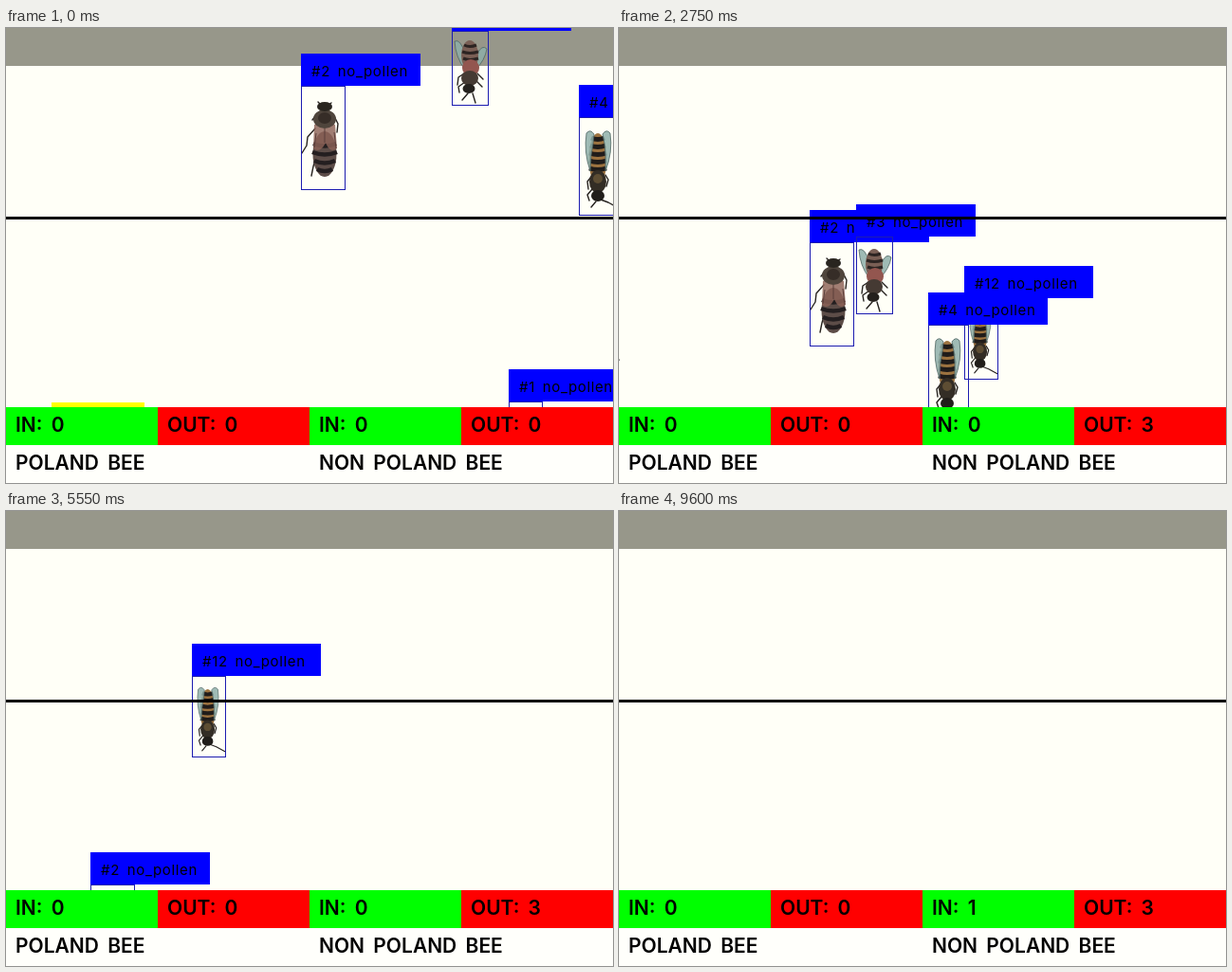
These frames come from a looping animation (640 px wide and 480 px high, 10 s). An HTML page:

```html
<!DOCTYPE html>
<html lang="en">
<head>
<meta charset="utf-8">
<title>Bee counter</title>
<style>
  html, body { margin: 0; width: 100%; height: 100%; overflow: hidden; background: #fffff7; }
  svg { display: block; width: 640px; height: 480px; }
  text { font-family: Inter, "Open Sans", sans-serif; fill: #000; }
  .panel text { font-size: 21px; font-weight: 600; word-spacing: 4px; }
  .tags text { font-size: 15px; letter-spacing: .65px; word-spacing: 3px; }
  .frame { fill: none; stroke: #1c1cb0; stroke-width: 1; }
  .leg { fill: none; stroke: #26221f; stroke-width: 1.4; stroke-linecap: round; stroke-linejoin: round; }
  .wing { fill: #8fb0aa; fill-opacity: .85; stroke: #4f6562; stroke-width: .8; }
</style>
</head>
<body>
<svg viewBox="0 0 640 480" xmlns="http://www.w3.org/2000/svg">
  <defs>
    <!-- head up, long left legs -->
    <g id="plain">
      <path class="leg" d="M15 45 7 54 6 63 1 71M15 78 13 85 11 95M16 31 12 36M35 32 39 40 38 49M21 20 18 17M29 20 32 18"/>
      <ellipse cx="25" cy="72" rx="12.5" ry="24" fill="#5d4d48"/>
      <path d="M13 61Q25 66 37 61M12 70Q25 75 38 70M14 79Q25 84 36 79M17 88Q25 92 33 88" fill="none" stroke="#241f20" stroke-width="4.5"/>
      <path d="M14 41Q24 35 36 41L38 66Q31 72 26 60Q20 72 13 66Z" fill="#8d6257" fill-opacity=".82"/>
      <path d="M16 50 14 65M35 49 37 66M25 45V60" stroke="#5a3e3a" fill="none"/>
      <ellipse cx="25" cy="35" rx="12" ry="10" fill="#4f453c"/>
      <ellipse cx="25" cy="34" rx="7" ry="6" fill="#362d27"/>
      <ellipse cx="25" cy="22" rx="8" ry="5" fill="#29251f"/>
    </g>
    <!-- head down, open wings -->
    <g id="open">
      <path class="leg" d="M13 48 7 52 6 60M14 57 7 62 8 68M27 48 33 54M26 56 32 62M17 69 11 76M22 69 25 79"/>
      <path class="wing" d="M14 44Q4 31 3 14Q9 11 14 27L17 42ZM25 44Q35 34 37 22Q32 17 27 27Z"/>
      <ellipse cx="19" cy="29" rx="9" ry="16" fill="#7a5f55"/>
      <path d="M13 18Q19 21 26 18M11 25Q19 28 28 25M12 32Q19 35 28 32" fill="none" stroke="#2c2422" stroke-width="3"/>
      <ellipse cx="20" cy="42" rx="9" ry="9" fill="#93564f"/>
      <ellipse cx="19" cy="53" rx="9" ry="8" fill="#453a33"/>
      <ellipse cx="18" cy="64" rx="6.5" ry="5" fill="#25211d"/>
    </g>
    <!-- head down, folded wings and one long feeler -->
    <g id="striped">
      <path class="leg" d="M13 63 9 68 10 76M28 61 31 66 29 73M14 76 9 82 11 88M18 89 13 95M23 87 31 90 42 96"/>
      <ellipse cx="20" cy="44" rx="9.5" ry="27" fill="#9d7340"/>
      <path d="M13 22Q20 25 27 22M12 30Q20 33 28 30M11 38Q20 41 29 38M11 46Q20 49 29 46M11 54Q20 57 29 54" fill="none" stroke="#201c1a" stroke-width="5"/>
      <path class="wing" d="M12 57Q5 37 8 17Q12 12 16 18L15 28 13 40ZM28 57Q36 37 33 17Q29 12 25 18L27 28 28 40Z"/>
      <ellipse cx="20" cy="68" rx="9" ry="12" fill="#332d25"/>
      <ellipse cx="20" cy="65" rx="5" ry="5" fill="#5d4d33"/>
      <ellipse cx="20" cy="83" rx="7" ry="6" fill="#211e1a"/>
    </g>
    <g id="loaded">
      <use href="#plain" transform="translate(4 -2) scale(1.15)"/>
      <path class="leg" d="M44 32 55 24 62 14M43 62 52 71"/>
      <circle cx="16" cy="62" r="5" fill="#e0a52a"/>
      <circle cx="49" cy="62" r="5" fill="#e0a52a"/>
    </g>
  </defs>

  <rect width="640" height="480" fill="#fffff7"/>
  <rect width="640" height="40" fill="#97978a"/>
  <g id="bees"></g>
  <g id="tags" class="tags"></g>
  <rect y="199" width="640" height="3" fill="#000"/>
  <g class="panel">
    <rect y="400" width="640" height="80" fill="#fffffb"/>
    <path d="M0 400h160v40H0zM320 400h160v40H320z" fill="#0f0"/>
    <path d="M160 400h160v40H160zM480 400h160v40H480z" fill="#f00"/>
    <text x="10" y="426">IN: 0</text>
    <text x="170" y="426">OUT: 0</text>
    <text x="330" y="426" id="in"></text>
    <text x="490" y="426" id="out"></text>
    <text x="10" y="466">POLAND BEE</text>
    <text x="330" y="466">NON POLAND BEE</text>
  </g>
</svg>
<script>
const LOOP = 10000, STEP = 50, TAG_H = 33, LINE = 200;
const byId = id => document.getElementById(id);

// x, y: tag corner at the start; vx, vy: pixels per step; w, h: detection box
const second = { sprite: 'plain', x: 311, y: 28, vx: -2, vy: 3, w: 46, h: 109, end: 125 };
const third = { sprite: 'open', x: 470, y: -32.6, vx: -4, vy: 4, w: 38, h: 81, end: 109 };
const fourth = { sprite: 'striped', x: 604, y: 61, vx: -5.05, vy: 3.99, w: 42, h: 103, end: 86 };
const riser = { sprite: 'striped', scale: .83, x: 530, y: 361, vx: -3.01, vy: -1.985, w: 35, h: 85, end: 189 };
const carrier = { sprite: 'loaded', x: 48, y: 396, vx: -2, vy: -1.7, w: 66, h: 115, end: 57, tagEnd: 38, pollen: true };
const merged = { x: 383, y: 30, vx: -3, vy: 3, w: 55, h: 110, start: 86, end: 93 };

const place = (bee, n) => ({
  x: Math.round(bee.x + bee.vx * n),
  y: Math.round(bee.y + bee.vy * n)
});
const shown = (bee, n) => n >= (bee.start || 0) && n < bee.end;

function drawBee(bee, n) {
  if (!bee.sprite || !shown(bee, n)) return '';
  const { x, y } = place(bee, n);
  return `<use href="#${bee.sprite}" transform="translate(${x} ${y + TAG_H}) scale(${bee.scale || 1})"/>`;
}

function drawTag(bee, id, width, n) {
  if (!shown(bee, n) || n >= bee.tagEnd) return '';
  const p = place(bee, n);
  const x = Math.max(0, p.x), y = Math.max(-30, p.y), top = y + TAG_H;
  const boxW = Math.max(0, p.x + bee.w - x), boxH = Math.max(0, p.y + TAG_H + bee.h - top);
  const fill = bee.pollen ? '#ff0' : '#00f';
  const edge = bee.pollen ? ' style="stroke:#c8c800"' : '';
  const rule = bee.pollen ? `<path d="M${x} ${top + .5}h${width}" stroke="#222"/>` : '';
  return `<rect class="frame"${edge} x="${x + .5}" y="${top + .5}" width="${boxW}" height="${boxH}"/>
    <rect x="${x}" y="${y - 1}" width="${width}" height="${TAG_H + 1}" fill="${fill}"/>${rule}
    <text x="${x + 11}" y="${y + 22.5}">#${id} ${bee.pollen ? 'pollen' : 'no_pollen'}</text>`;
}

function draw(n) {
  byId('bees').innerHTML = [carrier, riser, fourth, third, second]
    .map(bee => drawBee(bee, n)).join('');

  const tag = (bee, id, width) => drawTag(bee, id, width, n);
  const two = tag(second, 2, 126), three = tag(third, 3, 126);
  const none = tag(merged, 'None', 154);
  byId('tags').innerHTML = [
    n < 15 ? tag(carrier, 0, 98) : tag(carrier, 'None', 126),
    n < 30 ? tag(riser, 1, 126) : tag(riser, 12, 136),
    tag(fourth, 4, 126),
    ...(n < 38 ? [three, two] : [two, none, three])
  ].join('');

  // a bee counts once its whole box has passed the line
  const left = [second, third, fourth]
    .filter(bee => bee.y + TAG_H + bee.vy * n > LINE).length;
  const entered = riser.y + TAG_H + riser.h + riser.vy * n < LINE ? 1 : 0;
  byId('out').textContent = 'OUT: ' + left;
  byId('in').textContent = 'IN: ' + entered;
}

const begin = performance.now();
let last = -1;
function tick() {
  const n = Math.floor((performance.now() - begin) % LOOP / STEP);
  if (n !== last) draw(last = n);
  requestAnimationFrame(tick);
}
tick();
</script>
</body>
</html>
```
